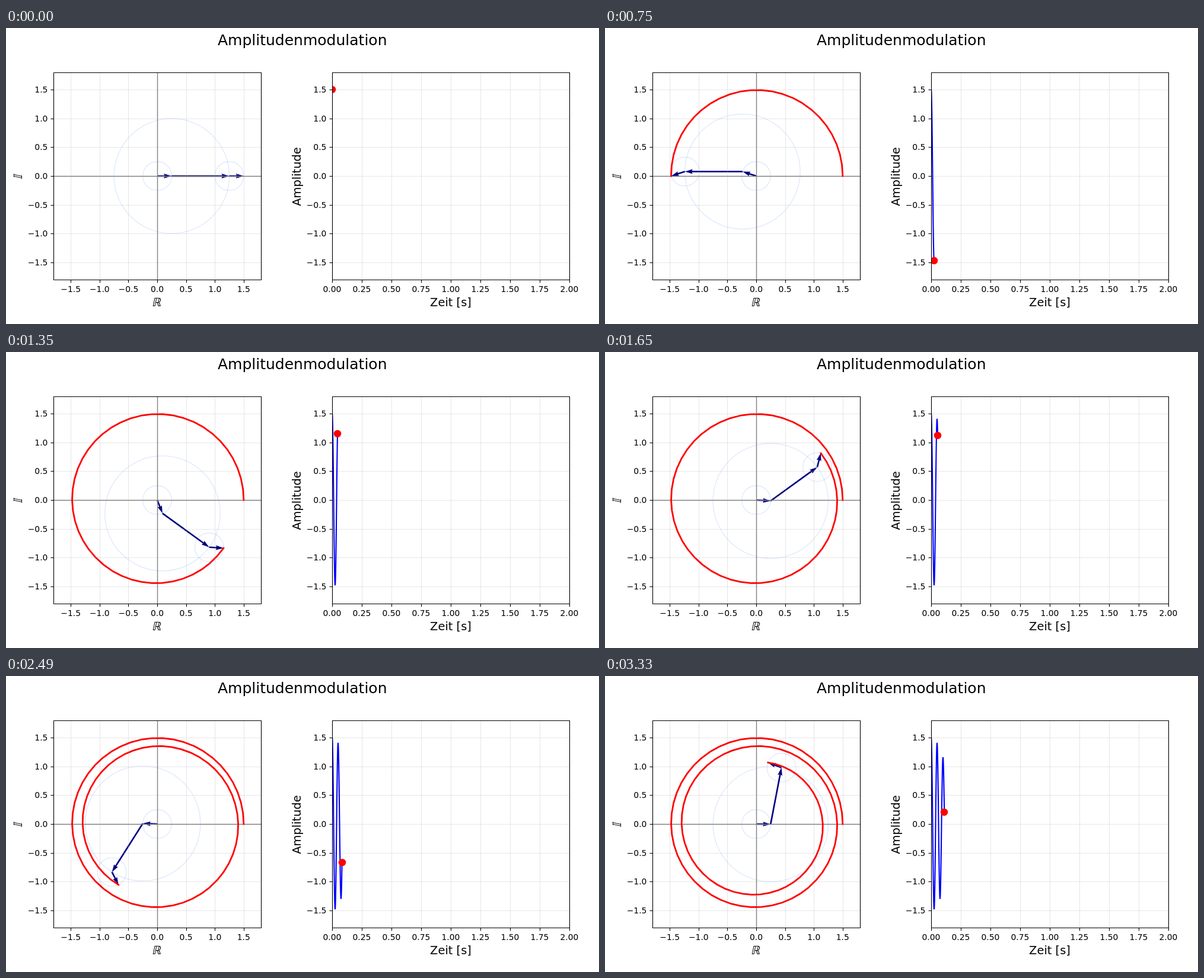
An HTML page for the animation above (3.36 s loop, 1000 by 500 pixels).

```html
<!DOCTYPE html>
<html lang="de">
<head>
<meta charset="utf-8">
<title>Amplitudenmodulation</title>
<style>
  html, body { margin: 0; width: 100%; height: 100%; overflow: hidden; background: #fff; }
  svg { display: block; width: 1000px; height: 500px; }
  text { font-family: "DejaVu Sans", sans-serif; font-size: 13.89px; fill: #000; }
  .title { font-size: 25px; }
  .label { font-size: 19.44px; }
  .mid { text-anchor: middle; }
  .end { text-anchor: end; }
  path, polyline { fill: none; }
  .grid { stroke: #b0b0b0; stroke-opacity: .3; stroke-width: 1.11; }
  .frame { stroke: #000; stroke-width: 1.11; }
  .zero { stroke: #808080; stroke-width: 1.39; }
  .orbit { fill: none; stroke: #6495ed; stroke-opacity: .2; stroke-width: 1.39; }
  .arrow { fill: #000080; }
  .curve { stroke-linecap: square; stroke-linejoin: round; }
  .trail { stroke: #f00; stroke-width: 2.78; }
  .wave { stroke: #00f; stroke-width: 2.08; }
</style>
</head>
<body>
<svg id="stage" viewBox="0 0 1000 500">
  <clipPath id="clipL"><rect x="80" y="75" width="350" height="350"/></clipPath>
  <clipPath id="clipR"><rect x="550" y="75" width="400" height="350"/></clipPath>
</svg>
<script>
const STEP = 30, FRAMES = 112, DT = 0.001;
const CX = 255, CY = 250, UNIT = 350 / 3.6;
const T0 = 550, SEC = 200;
const SHAFT = 2.625;
const phasors = [
  { amp: 0.25, freq: 18 },
  { amp: 1, freq: 20 },
  { amp: 0.25, freq: 22 }
];

const stage = document.getElementById('stage');
const px = v => CX + v * UNIT;
const py = v => CY - v * UNIT;
const snap = v => Math.round(v) + 0.5;

function add(parent, tag, attrs, text) {
  const el = document.createElementNS('http://www.w3.org/2000/svg', tag);
  set(el, attrs);
  if (text) el.textContent = text;
  parent.appendChild(el);
  return el;
}
function set(el, attrs) {
  for (const key in attrs) el.setAttribute(key, attrs[key]);
}
function label(x, y, cls, text, transform) {
  const attrs = { x, y, class: cls };
  if (transform) attrs.transform = transform;
  add(stage, 'text', attrs, text);
}
const number = (v, digits) => (v < 0 ? '\u2212' : '') + Math.abs(v).toFixed(digits);

// Layers from back to front
const back = add(stage, 'g', { 'clip-path': 'url(#clipL)' });
const grid = add(stage, 'g', {});
const left = add(stage, 'g', { 'clip-path': 'url(#clipL)' });
const right = add(stage, 'g', { 'clip-path': 'url(#clipR)' });

const levels = [-1.5, -1, -0.5, 0, 0.5, 1, 1.5];

function drawAxes(x0, x1, xTicks, place, digits) {
  for (const v of xTicks) {
    const x = place(v);
    add(grid, 'path', { class: 'grid', d: `M${snap(x)} 75V425` });
    add(stage, 'path', { class: 'frame', d: `M${snap(x)} 425.5v5` });
    label(x, 446, 'mid', number(v, digits));
  }
  for (const v of levels) {
    const y = py(v);
    add(grid, 'path', { class: 'grid', d: `M${x0} ${snap(y)}H${x1}` });
    add(stage, 'path', { class: 'frame', d: `M${x0 - 4.5} ${snap(y)}h5` });
    label(x0 - 9.6, Math.round(y) + 5, 'end', number(v, 1));
  }
  add(stage, 'path', { class: 'frame', d: `M${x0 + 0.5} 75.5H${x1 + 0.5}V425.5H${x0 + 0.5}Z` });
}

drawAxes(80, 430, levels, px, 1);
drawAxes(550, 950, Array.from({ length: 9 }, (_, i) => i / 4), t => T0 + t * SEC, 2);

label(357, 29, 'title', 'Amplitudenmodulation');
label(750, 470, 'label mid', 'Zeit [s]');
label(0, 0, 'label mid', 'Amplitude', 'translate(497 251) rotate(-90)');
label(0, 0, 'label mid', '\u211d', 'translate(253.5 470) skewX(-12)');
label(0, 0, 'label mid', '\u{1d540}', 'translate(26.5 252) rotate(-90) skewX(-12)');

const orbits = phasors.map(p => add(back, 'circle', { class: 'orbit', r: p.amp * UNIT }));
const arrows = phasors.map(p => {
  const len = p.amp * UNIT, h = SHAFT / 2, neck = len - 4.5 * SHAFT, barb = len - 5 * SHAFT;
  return add(back, 'polygon', {
    class: 'arrow',
    points: `0,${-h} ${neck},${-h} ${barb},${-3 * h} ${len},0 ${barb},${3 * h} ${neck},${h} 0,${h}`
  });
});
add(left, 'path', { class: 'zero', d: 'M80 250.5H430M255.5 75V425' });
const trail = add(left, 'polyline', { class: 'curve trail' });
const wave = add(right, 'polyline', { class: 'curve wave' });
const dot = add(right, 'circle', { r: 6.25, fill: '#f00' });

// Joints of the phasor chain at time t; the last one is the sum
function chain(t) {
  let x = 0, y = 0;
  const joints = [{ x, y }];
  for (const { amp, freq } of phasors) {
    const a = 2 * Math.PI * freq * t;
    x += amp * Math.cos(a);
    y += amp * Math.sin(a);
    joints.push({ x, y });
  }
  return joints;
}

const sums = Array.from({ length: FRAMES }, (_, i) => chain(i * DT)[phasors.length]);
const trailPoints = sums.map(p => `${px(p.x).toFixed(2)},${py(p.y).toFixed(2)}`);
const wavePoints = sums.map((p, i) => `${(T0 + i * DT * SEC).toFixed(2)},${py(p.x).toFixed(2)}`);

function draw(n) {
  const t = n * DT, joints = chain(t);
  phasors.forEach((p, i) => {
    const x = px(joints[i].x), y = py(joints[i].y);
    set(orbits[i], { cx: x, cy: y });
    set(arrows[i], { transform: `translate(${x} ${y}) rotate(${-360 * p.freq * t})` });
  });
  const upTo = list => n ? list.slice(0, n + 1).join(' ') : '';
  set(trail, { points: upTo(trailPoints) });
  set(wave, { points: upTo(wavePoints) });
  set(dot, { cx: Math.round(T0 + t * SEC), cy: Math.round(py(sums[n].x)) });
}

let start = null, shown = 0;
function tick(now) {
  if (start === null) start = now;
  const n = Math.floor((now - start) / STEP + 0.001) % FRAMES;
  if (n !== shown) draw(shown = n);
  requestAnimationFrame(tick);
}
draw(0);
requestAnimationFrame(tick);
</script>
</body>
</html>
```
